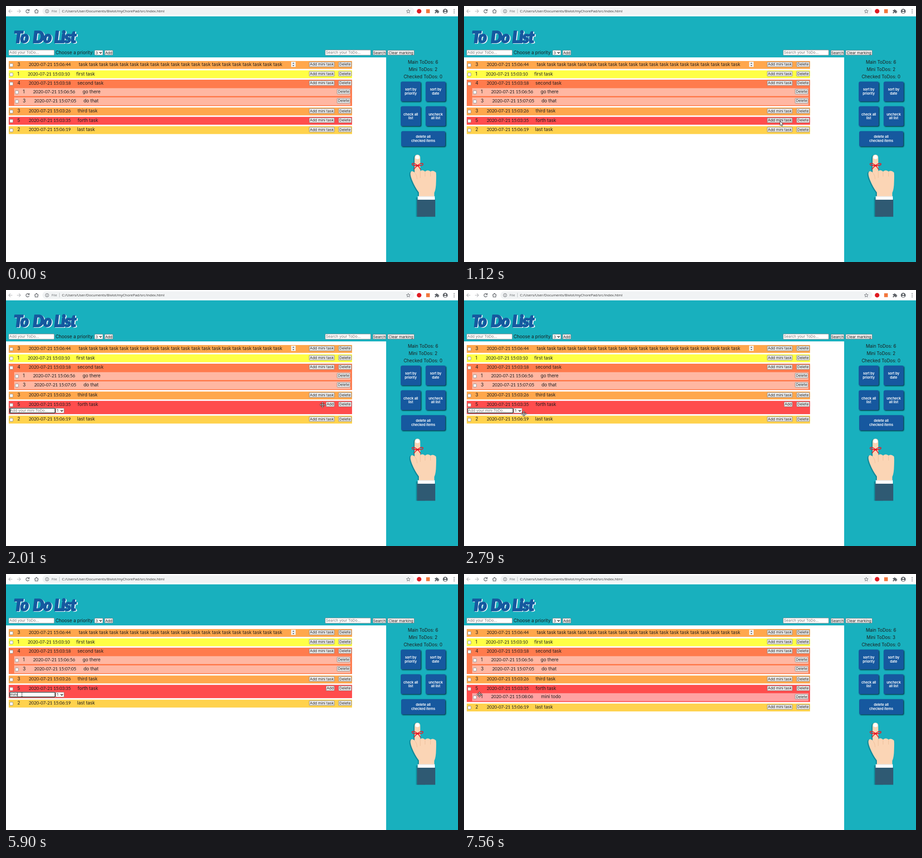
An HTML page that plays this animation: 994x563 px, repeating every 8000 ms.

```html
<!DOCTYPE html>
<html lang="en">
<head>
<meta charset="utf-8">
<title>To Do List</title>
<style>
  html, body { margin: 0; width: 100%; height: 100%; overflow: hidden; background: #fff; }
  svg { display: block; width: 100%; height: 100%; }
  text { font: 10px Inter, "Open Sans", sans-serif; fill: #1c1c1c; white-space: pre; }
  .date { font: 10px Lato, sans-serif; letter-spacing: -.2px; }
  .ui { font-size: 8.2px; fill: #222; }
  .hint { font-size: 8.2px; fill: #777; }
  .mid { text-anchor: middle; }
  .side { font-size: 9.8px; }
  .blue { font-size: 7.7px; font-weight: 600; fill: #fff; letter-spacing: -.1px; }
  .url { font: 7.9px "Open Sans", sans-serif; fill: #333; }
  .title { font: italic 900 35px Lato, sans-serif; letter-spacing: -1.5px; stroke-width: 2; stroke-linejoin: round; }
</style>
</head>
<body>
<svg id="stage" viewBox="0 0 994 563" preserveAspectRatio="none"></svg>
<script>
const stage = document.getElementById('stage');
const TEAL = '#18b0be', BLUE = '#15599f';

// Markup helpers
const rect = (x, y, w, h, fill, more = '') =>
  `<rect x="${x}" y="${y}" width="${w}" height="${h}" fill="${fill}" ${more}/>`;
const path = (d, fill = 'none', stroke = 'none', width = 1, more = '') =>
  `<path d="${d}" fill="${fill}" stroke="${stroke}" stroke-width="${width}" ${more}/>`;
const text = (x, y, str, cls = '', more = '') => `<text x="${x}" y="${y}" class="${cls}" ${more}>${str}</text>`;
const circle = (x, y, r, fill, more = '') => `<circle cx="${x}" cy="${y}" r="${r}" fill="${fill}" ${more}/>`;
const group = (id, body, more = '') => `<g id="${id}" ${more}>${body}</g>`;

const EDGE = 'stroke="#767676" stroke-width=".8" rx="1"';
const button = (x, y, w, label, id = '') =>
  rect(x, y, w, 10.4, '#efefef', EDGE + (id && ` id="${id}"`)) + text(x + w / 2, y + 8.1, label, 'ui mid');
const field = (x, y, hint) => rect(x, y, 100, 11.4, '#fff', EDGE) + text(x + 1.5, y + 8.6, hint, 'hint');
const select = (x, y, value) => rect(x, y, 18, 10.6, '#fff', EDGE) + text(x + 2, y + 8.3, value, 'ui') +
  path(`M${x + 10.5} ${y + 4.2}l2.5 2.5 2.5-2.5`, 'none', '#111', 1.3);

// One line of a task: checkbox, priority, date and label
const line = (x, y, priority, dateX, date, labelX, label) =>
  rect(x + 2.3, y + 5.5, 7, 7, '#fff', EDGE) + text(x + 19, y + 11, priority) +
  text(dateX, y + 11, '2020-07-21 ' + date, 'date') + text(labelX, y + 11, label);

function task(y, h, fill, item, action = 'Add mini task', id = '') {
  const w = action === 'Add' ? 18 : 55;
  return rect(6, y, 755, h, fill) + line(6, y, ...item) +
    button(722 - w, y + 2.3, w, action, id) + button(731.5, y + 2.3, 28, 'Delete');
}
const mini = (y, fill, item) =>
  rect(18, y, 739.5, 17.3, fill) + line(18, y, ...item) + button(728.3, y + 2.3, 28, 'Delete');

function browserBar() {
  const grey = '#5f6368', faded = '#b5b7ba';
  let s = rect(0, 0, 994, 22.5, '#fff') + rect(80, 3, 818, 16.5, '#f1f3f4', 'rx="8.2"');
  s += path('M14 11.5H6M9.7 7.7L6 11.5l3.7 3.8', 'none', faded, 1.2);
  s += path('M24 11.5h8M28.3 7.7l3.7 3.8-3.7 3.8', 'none', faded, 1.2);
  s += path('M50 9A3.6 3.6 0 1 0 51 12.6M51.2 7v3.2H48', 'none', grey, 1.3);
  s += path('M62.6 11.5L67 7.4l4.4 4.1M64 11v4.3h6V11', 'none', grey, 1.2);
  s += circle(90.3, 11.5, 3.7, 'none', `stroke="${grey}" stroke-width=".9"`);
  s += path('M90.3 9v1M90.3 10.9v2.8', 'none', grey, 1);
  s += text(100, 14.4, 'File', 'url', 'style="fill:#6b6f73"') + rect(117, 6.5, .8, 9.5, '#b0b3b6');
  s += text(123, 14.4, 'C:/Users/User/Documents/Bivlot/myChorePad/src/index.html', 'url');
  s += path('M884.7 7.4l1.2 2.8 3 .2-2.3 2 .7 3-2.6-1.6-2.6 1.6.7-3-2.3-2 3-.2z', 'none', grey, .9);
  s += circle(908.5, 11.5, 5, '#e01b22') + rect(924, 7.2, 8, 8.5, '#f2773d');
  s += path('M943 9h2.6a1.4 1.4 0 1 1 2.8 0h2.4v2.4a1.4 1.4 0 1 1 0 2.7V16h-2.5a1.4 1.4 0 1 0-2.6 0H943v-2.2a1.4 1.4 0 1 0 0-2.7z', grey);
  s += circle(966, 11.5, 5.4, grey) + circle(966, 9.7, 1.8, '#fff') + path('M962.5 14.2q3.5-3 7 0-3.5 3.4-7 0z', '#fff');
  return s + [7.8, 11.5, 15.2].map(y => circle(985.5, y, 1, grey)).join('');
}

function header() {
  const words = '<tspan x="17">To</tspan><tspan x="59">Do</tspan><tspan x="106">List</tspan>';
  const title = (d, c) => text(0, 80.5 + d, words, 'title', `style="fill:${c};stroke:${c}" transform="translate(${d})"`);
  return title(1.8, '#fff') + title(0, BLUE) +
    field(6, 96.8, 'Add your ToDo...') + text(109, 105.5, 'Choose a priority:') + select(195, 97.3, 3) +
    button(217, 97.4, 18, 'Add') + field(702, 96.8, 'Search your ToDo...') +
    button(807, 97.4, 28.5, 'Search') + button(839.5, 97.4, 58, 'Clear marking');
}

function bigButton(x, y, w, h, top, bottom) {
  const c = x + w / 2, m = y + h / 2;
  return rect(x, y, w, h, BLUE, 'rx="3.5" filter="url(#drop)"') +
    text(c, m - 1.7, top, 'blue mid') + text(c, m + 7, bottom, 'blue mid');
}

function hand() {
  const skin = 'M898.5 366V334q0-7 6.3-7 6.2 0 6.2 7V363q5-4 10.5 1 6-5 12 0 6-4 12 2 1 3 .3 20-.2 17-4 25v8H908v-9q-9-12-15-27-6-15-2-19 3-2 7.5 2z';
  const sleeve = 'M904 426h40v37.5h-40z';
  let s = `<g transform="translate(-2.5 1)">${path(skin, '#128b9b')}${path('M904 420h20v42.5h-20z', '#128b9b')}</g>`;
  s += path(skin, '#fbd5b5') + path('M900 335q0-7.5 4.8-7.5t4.8 7.5q-4.8 3.5-9.6 0z', '#fff');
  s += path('M911 363v15M921.5 364v11M933.5 364v11M899 367q5 5 5 14', 'none', '#e8b894', .8);
  s += rect(905.5, 418.5, 37.5, 8, '#fff') + rect(905.5, 418.5, 37.5, 1.3, '#dfe5e8');
  s += circle(908, 423.5, .8, '#b9c6cc') + path(sleeve, '#2f5a73');
  s += path('M898 350.5q7 2 13.5 0', 'none', '#e3202b', 2.2);
  s += path('M905 351q-8-7-12-4-1 5 12 4 8-7 12-4 1 5-12 4M905 351q-4 3-8 8M905 351q4 3 7 9', 'none', '#e3202b', 1.6);
  return s + circle(905, 351, 2, '#e3202b');
}

function sidebar() {
  return text(917, 127, 'Main ToDos: 6', 'side mid') + text(917, 143, 'Mini ToDos: 2', 'side mid', 'id="count"') +
    text(917, 159, 'Checked ToDos: 0', 'side mid') +
    bigButton(868, 166.3, 44, 43.5, 'sort by', 'priority') + bigButton(922.8, 166.3, 44, 43.5, 'sort by', 'date') +
    bigButton(868, 220.5, 44, 43.5, 'check all', 'list') + bigButton(922.8, 220.5, 44, 43.5, 'uncheck', 'all list') +
    bigButton(869, 275.2, 97, 33.5, 'delete all', 'checked items') + hand();
}

const ORANGE = '#ffa74c', RED = '#ff4d4d', PEACH = '#ffb7a2';
const forth = [5, 50, '15:03:35', 157.5, 'forth task'];
const last = y => task(y, 17.3, '#ffd24d', [2, 50, '15:06:19', 156.5, 'last task']);

const upperTasks =
  task(121, 17.3, ORANGE, [3, 50, '15:06:44', 160, Array(20).fill('task').join(' ')]) +
  rect(627, 122.5, 10, 11.5, '#f1f1f1') + path('M630 127l2-2.5 2 2.5zM630 130l2 2.5 2-2.5z', '#555') +
  task(141.5, 17.3, '#ffff45', [1, 48, '15:03:10', 154.5, 'first task']) +
  task(162, 58, '#ff7b4d', [4, 50, '15:03:18', 157, 'second task']) +
  mini(180.7, PEACH, [1, 59.5, '15:06:56', 168.5, 'go there']) +
  mini(201, PEACH, [3, 62, '15:07:05', 170.5, 'do that']) +
  task(223.3, 17.3, ORANGE, [3, 50, '15:03:26', 157.5, 'third task']);

const before = task(243.8, 17.3, RED, forth, 'Add mini task', 'target') + last(264.3);
const form = task(243.8, 29.2, RED, forth, 'Add') + last(276.4) +
  rect(7.2, 259.1, 101.6, 12.4, '#fff', 'rx="1.5"') +
  rect(8.2, 260.1, 99.6, 10.4, '#fff', 'stroke="#101010" stroke-width="1.4" rx="1"') +
  text(9, 268.3, '', 'ui', 'id="typed"') + rect(9, 261.3, .8, 8, '#000', 'id="caret"') + select(109.7, 260.1, 1);
const after = task(243.8, 37.7, RED, forth) +
  mini(262.2, '#ffa2a3', [1, 59.5, '15:08:06', 169.5, 'mini todo']) + last(284.9);

const MOVE = 'M0-6.2L2.3-3.7H.8V-.8H3.7V-2.3L6.2 0 3.7 2.3V.8H.8V3.7H2.3L0 6.2-2.3 3.7H-.8V.8H-3.7V2.3L-6.2 0-3.7-2.3V-.8H-.8V-3.7H-2.3Z';
const cursors =
  group('arrow', path('M0 0V10l2.3-2.1 1.5 3.4 1.6-.7L4 7.3H7z', '#fff', '#111', .8)) +
  group('move', path(MOVE, '#fff', '#111', .8)) +
  group('beam', path('M-2-4.6h1.5l.5.5.5-.5H2M-2 4.6h1.5l.5-.5.5.5H2M0-4.1V4.1', 'none', '#222', .8));

stage.innerHTML =
  '<defs><filter id="drop" x="-20%" y="-20%" width="150%" height="150%">' +
  '<feDropShadow dx="1.4" dy="1.4" stdDeviation=".9" flood-color="#06232f" flood-opacity=".95"/></filter></defs>' +
  rect(0, 0, 994, 563, '#fff') + rect(0, 22.5, 994, 90.5, TEAL) + rect(836, 112, 158, 451, TEAL) +
  browserBar() + header() + sidebar() + upperTasks +
  group('before', before) + group('form', form) + group('after', after) + cursors;

const el = id => document.getElementById(id);
const show = (id, on) => el(id).style.display = on ? '' : 'none';

const LOOP = 8000, OPEN = 2010, DONE = 7560;
const KEYS = [5510, 5580, 5830, 5900, 5970, 6220, 6300, 6620, 6750];
const BLINKS = [2560, 3080, 3560, 4090, 4650, 5130, 7320];

// Pointer shape and place; both sweeps advance in discrete steps
function pointer(t) {
  if (t < 360) return null;
  if (t < OPEN) {
    const p = Math.min(10, Math.floor((t - 360) / 76)) / 10, q = 1 - (1 - p) ** 2;
    const nudge = t >= 1540 && t < 1610 ? .7 : 0;
    const y = 523 - 270 * q;
    const overRow = y > 264 && y < 281;
    return [overRow ? 'move' : 'arrow', 768 - 73 * q + nudge, y + nudge];
  }
  if (t < 2560) return ['move', 696, 252.5];
  if (t >= DONE) return ['move', 34, 265];
  const u = Math.min(6, 1 + Math.floor((t - 2560) / 74)) / 6;
  const q = 1 - (1 - u) ** 1.75;
  return [u < 1 ? 'move' : 'beam', 696 - 661 * q, 252.5 + 12.7 * q + 83 * q * q * (1 - q)];
}

function draw(t) {
  show('before', t < OPEN);
  show('form', t >= OPEN && t < DONE);
  show('after', t >= DONE);
  el('count').textContent = 'Mini ToDos: ' + (t < DONE ? 2 : 3);
  el('target').setAttribute('fill', t < 1080 ? '#efefef' : t < 1860 ? '#e2e2e2' : '#f5f5f5');

  const typed = 'mini todo'.slice(0, KEYS.filter(k => t >= k).length), box = el('typed');
  box.textContent = typed || 'Add your mini ToDo...';
  box.setAttribute('class', typed ? 'ui' : 'hint');
  el('caret').setAttribute('x', typed ? 9.2 + box.getComputedTextLength() : 9);
  show('caret', BLINKS.filter(b => t >= b).length % 2 === 0);

  const now = pointer(t);
  for (const id of ['arrow', 'move', 'beam']) show(id, now && now[0] === id);
  if (now) el(now[0]).setAttribute('transform', `translate(${now[1]} ${now[2]})`);
}

const start = performance.now();
function tick() {
  draw((performance.now() - start) % LOOP);
  requestAnimationFrame(tick);
}
draw(0);
tick();
</script>
</body>
</html>
```
